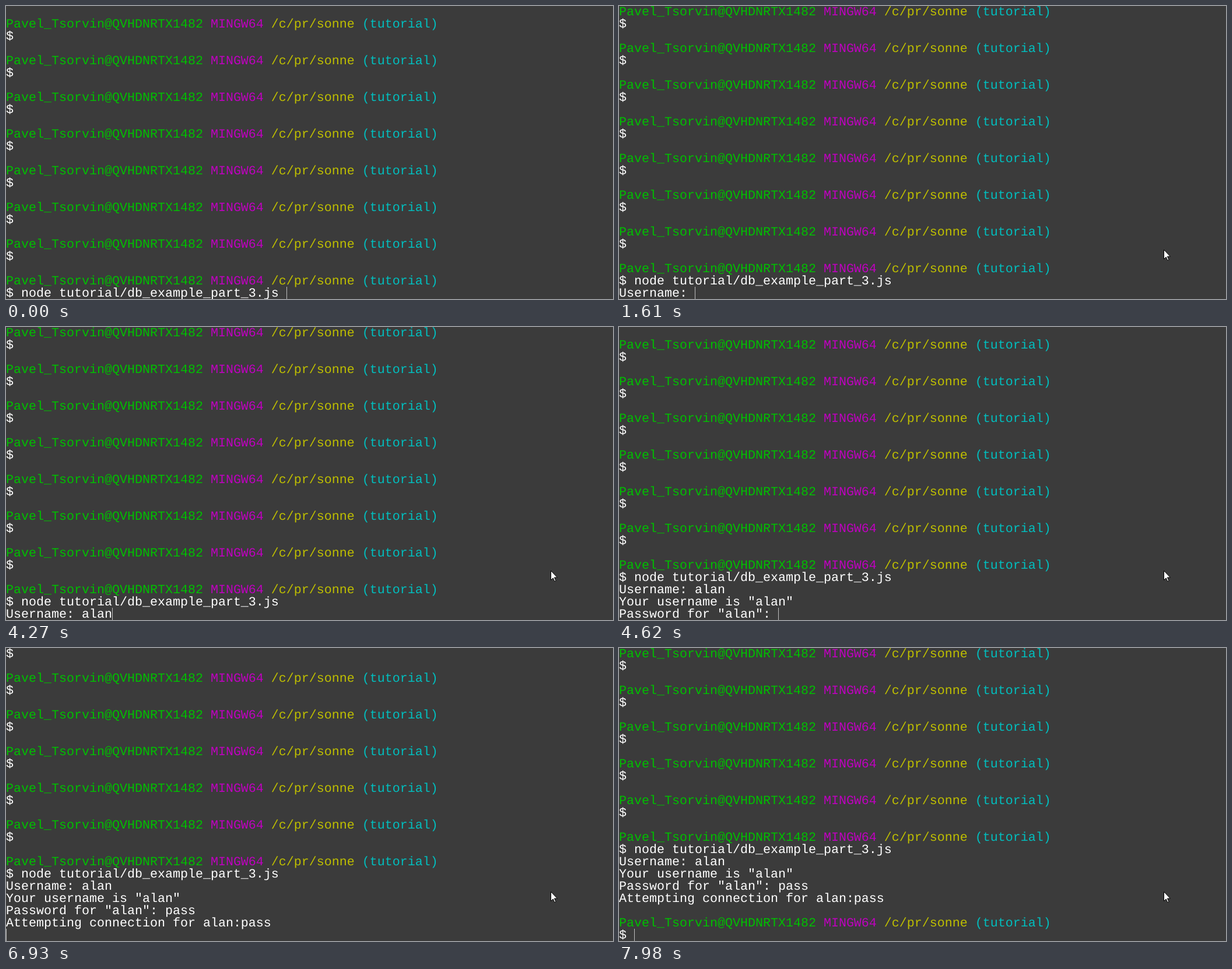
Recreate the animation shown at these times as an HTML page. Size 1041 by 503 pixels, loop 8000 ms.

```html
<!DOCTYPE html>
<html lang="en">
<head>
<meta charset="utf-8">
<title>Terminal session</title>
<style>
  html, body { margin: 0; width: 100%; height: 100%; overflow: hidden; background: #3b3b3b; }
  svg { display: block; width: 1041px; height: 503px; }
  text {
    font: 21.667px "Liberation Mono", "Noto Sans Mono", monospace;
    font-variant-ligatures: none;
    text-rendering: geometricPrecision;
    white-space: pre;
    fill: #fff;
  }
</style>
</head>
<body>
<svg viewBox="0 0 1041 503">
  <rect width="1041" height="503" fill="#3b3b3b"/>
  <g id="rows"></g>
  <rect id="caret" y="482" width="1" height="21" fill="#bfbfbf"/>
  <path id="pointer" d="M934.5 418.5v16l3.7-3.6 2.6 5.7 2.2-1-2.6-5.6h5z"
        fill="#fff" stroke="#000" stroke-width="1"/>
</svg>
<script>
const LOOP = 8000, ROWS = 24, ROW_HEIGHT = 21, CHAR_WIDTH = 13, LAST_BASELINE = 499;
const SVG_NS = 'http://www.w3.org/2000/svg';

const user = 'alan', password = 'pass';
const prompt = [
  ['Pavel_Tsorvin@QVHDNRTX1482 ', '#00bf00'],
  ['MINGW64 ', '#bf00bf'],
  ['/c/pr/sonne ', '#bfbf00'],
  ['(tutorial)', '#00bfbf'],
];
const command = '$ node tutorial/db_example_part_3.js ';
const askName = 'Username: ';
const askPassword = `Password for "${user}": `;

const idle = Array.from({ length: 8 }, () => ['$', '', prompt]).flat();
const started = [...idle, command];
const named = [...started, askName + user, `Your username is "${user}"`];
const connecting = [...named, askPassword + password, `Attempting connection for ${user}:${password}`];
const finished = [...connecting, '', prompt];

const typed = (lines, label, word, times) =>
  times.map((at, i) => ({ at, lines, input: label + word.slice(0, i) }));

const states = [
  { at: 0, lines: idle, input: command },
  { at: 420, lines: started, input: '' },
  ...typed(started, askName, user, [700, 2660, 2870, 3150, 3360]),
  ...typed(named, askPassword, password, [4620, 6020, 6160, 6370, 6440]),
  { at: 6930, lines: connecting, input: '' },
  { at: 7000, lines: finished, input: '$ ' },
];
const caretOff = [[210, 420], [1120, 1610], [2100, 2590], [3780, 4270], [5040, 5530], [7490, 7980]];
const POINTER_SHOWN = 490;

const caret = document.getElementById('caret');
const pointer = document.getElementById('pointer');

function add(parent, tag, attributes) {
  const node = document.createElementNS(SVG_NS, tag);
  for (const name in attributes) node.setAttribute(name, attributes[name]);
  return parent.appendChild(node);
}

const rows = Array.from({ length: ROWS }, (_, i) =>
  add(document.getElementById('rows'), 'text', {
    x: 0, y: LAST_BASELINE - (ROWS - 1 - i) * ROW_HEIGHT,
  }));

function setRow(row, line) {
  row.textContent = '';
  if (typeof line === 'string') {
    row.textContent = line;
    return;
  }
  for (const [text, fill] of line) {
    add(row, 'tspan', { style: `fill:${fill}` }).textContent = text;
  }
}

let shown;
function render(time) {
  const state = states.findLast(s => s.at <= time);
  if (state !== shown) {
    const screen = [...state.lines, state.input].slice(-ROWS);
    rows.forEach((row, i) => setRow(row, screen[i]));
    caret.setAttribute('x', state.input.length * CHAR_WIDTH);
    shown = state;
  }
  const hidden = caretOff.some(([from, to]) => time >= from && time < to);
  caret.setAttribute('visibility', hidden ? 'hidden' : 'visible');
  pointer.setAttribute('visibility', time >= POINTER_SHOWN ? 'visible' : 'hidden');
}

const start = performance.now();
function tick() {
  render((performance.now() - start) % LOOP);
  requestAnimationFrame(tick);
}
tick();
</script>
</body>
</html>
```
